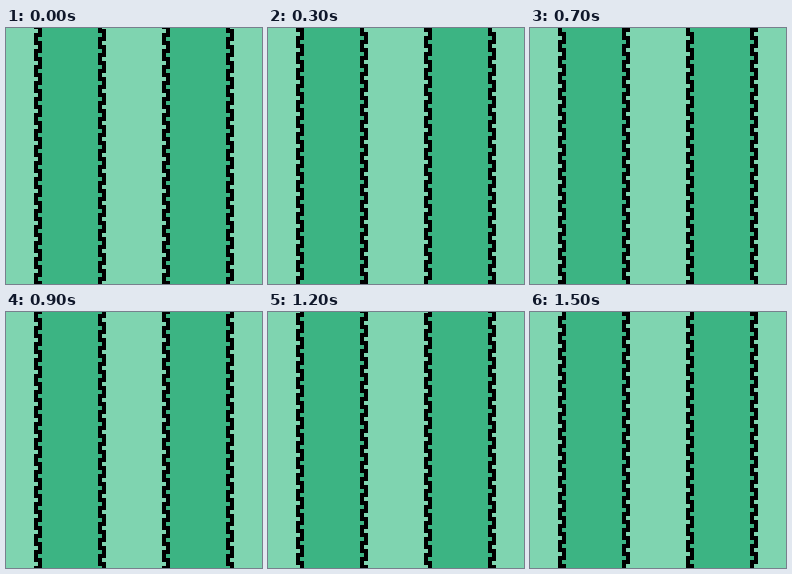
An HTML page with a canvas that plays this animation: 256x256 px, repeating every 1.6 s.

```html
<!DOCTYPE html>
<html>
<head>
<meta charset="utf-8">
<style>
  html, body { margin: 0; width: 100%; height: 100%; overflow: hidden; }
  canvas { display: block; }
</style>
</head>
<body>
<canvas id="stage" width="256" height="256"></canvas>
<script>
const ctx = document.getElementById('stage').getContext('2d');
const LIGHT = '#7fd4b0', DARK = '#3cb483', BLACK = '#000';
const PERIOD = 16, UNIT = 4, STEP_MS = 100;
const LEAD_MS = 10; // keeps a step from landing one refresh late

function rect(color, x, y, w, h) {
  ctx.fillStyle = color;
  ctx.fillRect(x, y, w, h);
}

// Black strip with square notches alternating between its two sides
function zigzag(x, shift, left, right) {
  rect(BLACK, x, 0, 2 * UNIT, 256);
  for (let y = shift % PERIOD - PERIOD; y < 256; y += PERIOD) {
    rect(left, x, y, UNIT, UNIT);
    rect(right, x + UNIT, y + PERIOD / 2, UNIT, UNIT);
    rect(right, x + UNIT, y - PERIOD / 2, UNIT, UNIT);
  }
}

function draw(now) {
  const step = Math.floor((now + LEAD_MS) / STEP_MS) % PERIOD;
  rect(LIGHT, 0, 0, 256, 256);
  for (const x of [32, 160]) {
    rect(DARK, x, 0, 64, 256);
    zigzag(x - UNIT, step + 1, LIGHT, DARK);
    zigzag(x + 60, step + 5, DARK, LIGHT);
  }
  requestAnimationFrame(draw);
}

draw(0);
</script>
</body>
</html>
```
